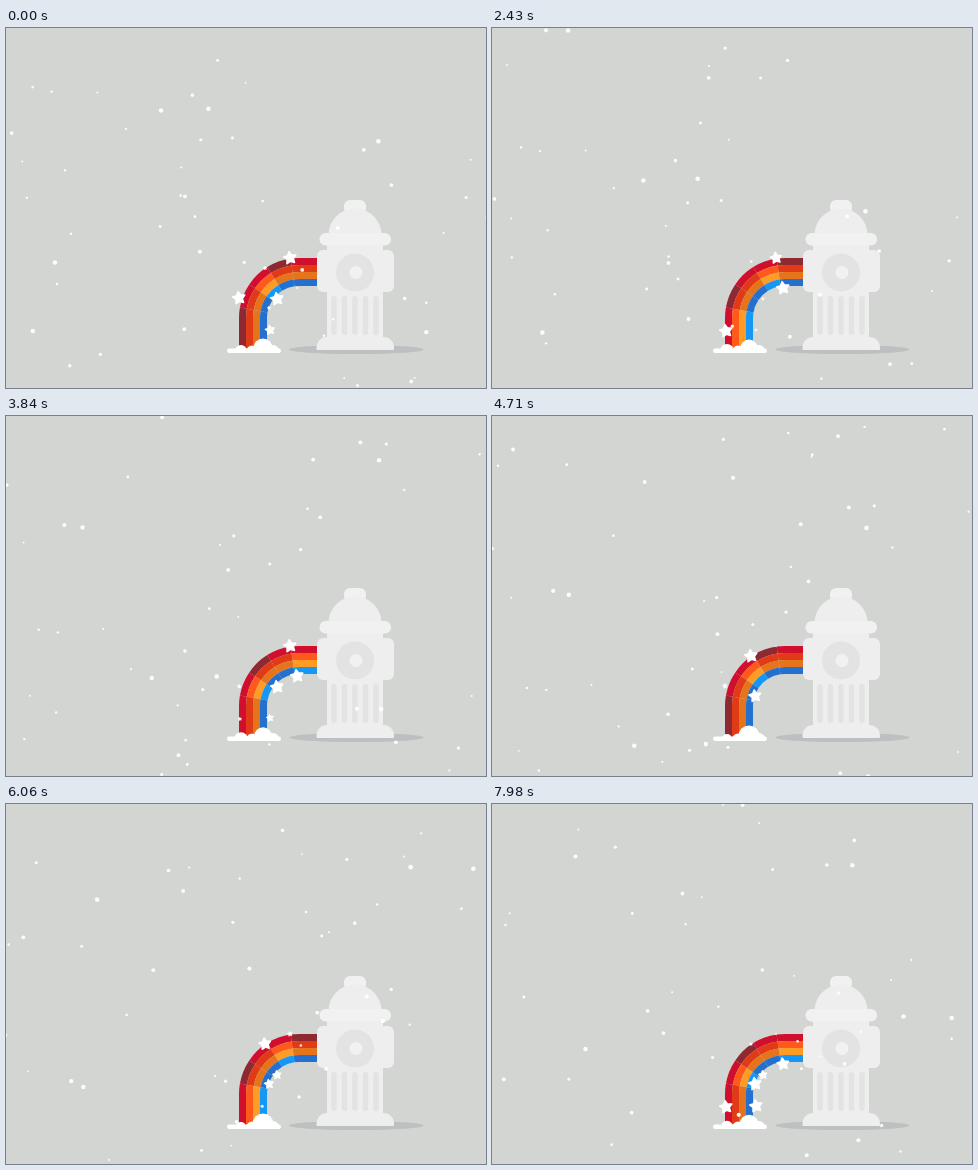
These frames come from a looping animation (480x360 px, 8000 ms). An HTML page with a canvas:

```html
<!DOCTYPE html>
<html lang="en">
<head>
<meta charset="utf-8">
<title>Rainbow hydrant</title>
<style>
  html, body { margin: 0; width: 100%; height: 100%; overflow: hidden; background: #d3d5d2; }
  canvas { display: block; width: 480px; height: 360px; }
</style>
</head>
<body>
<canvas id="stage" width="480" height="360"></canvas>
<script>
const ctx = document.getElementById('stage').getContext('2d');
const LOOP = 8000, CUT = 1050, HOLD = 840, STEP = 680;
const TAU = Math.PI * 2;
const FLAKES = 48;

// Each star swells around its peak time and again every period (ms).
const stars = [
  { x: 284, y: 230, peak: 0, period: 1270 },
  { x: 259, y: 240, peak: 4710, period: 1450 },
  { x: 233, y: 270, peak: 0, period: 1700 },
  { x: 234, y: 303, peak: 2430, period: 5550 },
  { x: 291, y: 260, peak: 2430, period: 1410 },
  { x: 271, y: 271, peak: 3840, period: 1920 },
  { x: 263, y: 280, peak: 1260, period: 1680 },
  { x: 264, y: 302, peak: 7980, period: 1300 }
];

const bands = [
  { radius: 56.5, base: '#d00f2f', accent: '#8e2932', lead: 0 },
  { radius: 49.5, base: '#e03a16', accent: '#ff5a1c', lead: 1 },
  { radius: 42.5, base: '#e5741a', accent: '#ff9c25', lead: 1 },
  { radius: 35.5, base: '#2470cf', accent: '#1598f5', lead: 1 }
];

const random = seed => {
  const v = Math.sin(seed * 127.1 + 11.7) * 43758.5453;
  return v - Math.floor(v);
};

function ellipse(x, y, rx, ry, color) {
  ctx.fillStyle = color;
  ctx.beginPath();
  ctx.ellipse(x, y, rx, ry, 0, 0, TAU);
  ctx.fill();
}
const circle = (x, y, r, color) => ellipse(x, y, r, r, color);

function box(x, y, w, h, r, color) {
  ctx.fillStyle = color;
  ctx.beginPath();
  ctx.roundRect(x, y, w, h, r);
  ctx.fill();
}

// Five segments per band: the nozzle, three 24° pieces of the bend, the foot.
function traceSegment(index, radius) {
  const cx = 293, cy = 290;
  const angle = degrees => -Math.PI / 2 - degrees * Math.PI / 180;
  const from = index === 0 ? 0 : 24 * index - 16;
  const to = index === 4 ? 90 : 24 * index + 8;
  ctx.beginPath();
  if (index === 0) ctx.moveTo(313, cy - radius);
  ctx.arc(cx, cy, radius, angle(from), angle(to), true);
  if (index === 4) ctx.lineTo(cx - radius, 322);
}

function drawRainbow(t) {
  const phase = t < CUT ? 1 : Math.floor((t + 80) / STEP);
  ctx.lineWidth = 7;
  for (const { radius, base, accent, lead } of bands) {
    for (let i = 0; i < 5; i++) {
      ctx.strokeStyle = i % 3 === (phase + lead) % 3 ? accent : base;
      traceSegment(i, radius);
      ctx.stroke();
    }
  }
}

function drawCloud(t) {
  const sway = Math.sin(t / 230);
  ctx.save();
  ctx.beginPath();
  ctx.rect(215, 300, 66, 25);
  ctx.clip();
  box(221, 320.5, 54, 4.5, 2.2, '#fff');
  circle(235, 323, 6 - sway, '#fff');
  circle(246, 323, 5.5, '#fff');
  circle(257, 320, 9.5 + sway, '#fff');
  circle(267, 323, 6, '#fff');
  ctx.restore();
}

function drawHydrant() {
  const light = '#eeeeee', edge = '#f1f1f1', dark = '#e2e3e2';
  box(338, 172, 22, 14, 6, edge);
  ctx.fillStyle = light;
  ctx.beginPath();
  ctx.arc(349, 207, 26.5, Math.PI, TAU);
  ctx.fill();
  box(321, 214, 56, 98, 0, light);
  box(311, 222, 77, 42, 6, light);
  box(313.5, 205, 71.5, 12.5, 6, edge);
  circle(349, 244.5, 19, dark);
  circle(350, 244.5, 6.5, edge);
  for (let i = 0; i < 5; i++) box(325.2 + i * 10.5, 268, 5.5, 39, 2.7, dark);
  box(310.5, 309, 77.5, 13, [10, 10, 1, 1], light);
}

function drawStar({ x, y, peak, period }, t) {
  const size = 7 * Math.max(0, 0.3 + 0.7 * Math.cos((t - peak) / period * TAU));
  if (size < 0.3) return;
  ctx.fillStyle = ctx.strokeStyle = '#fff';
  ctx.lineJoin = 'round';
  ctx.lineWidth = size * 0.22;
  ctx.beginPath();
  for (let i = 0; i < 10; i++) {
    const r = size * (i % 2 ? 0.48 : 0.92);
    const a = i * Math.PI / 5 - Math.PI / 2 - 0.15;
    ctx.lineTo(x + r * Math.cos(a), y + r * Math.sin(a));
  }
  ctx.closePath();
  ctx.fill();
  ctx.stroke();
}

// Larger flakes fall faster; each one re-enters the top at a new place.
function drawSnow(t) {
  const seconds = (t < CUT ? 1530 + Math.min(t, HOLD) : t) / 1000;
  for (let i = 0; i < FLAKES; i++) {
    const size = random(i);
    const fallen = random(i + 100) * 370 + (62 + 16 * size) * seconds;
    const y = fallen % 370;
    const entry = i + 200 + FLAKES * Math.floor(fallen / 370);
    const drift = (random(i + 500) - 0.5) * 0.12;
    circle(random(entry) * 480 + drift * y, y - 5, 0.8 + 1.5 * size, 'rgba(255,255,255,.92)');
  }
}

function render(t) {
  ctx.fillStyle = '#d3d5d2';
  ctx.fillRect(0, 0, 480, 360);
  ellipse(350.5, 321.5, 67, 4.5, '#bdbfc1');
  drawRainbow(t);
  drawCloud(t);
  drawHydrant();
  for (const star of stars) drawStar(star, t);
  drawSnow(t);
}

const start = performance.now();
function tick() {
  render((performance.now() - start) % LOOP);
  requestAnimationFrame(tick);
}
tick();
</script>
</body>
</html>
```
